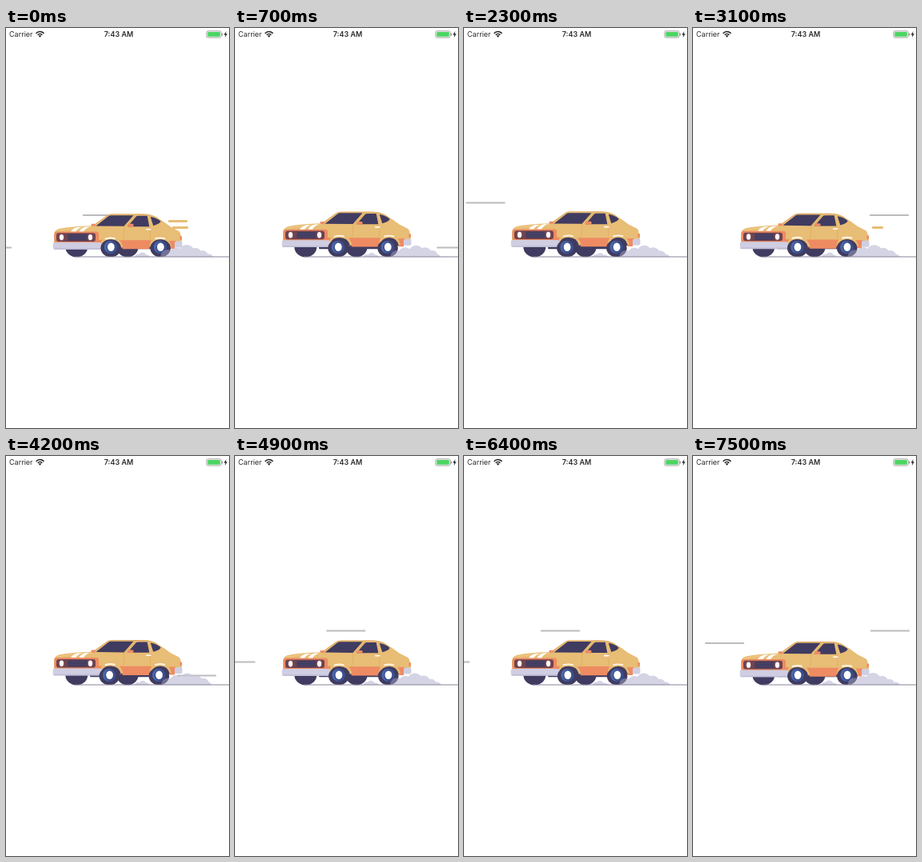
Animation of 279x500 px, one loop 7.6 s. Source, as an HTML page with a canvas:

```html
<!DOCTYPE html>
<html lang="en">
<head>
<meta charset="utf-8">
<title>Speeding car</title>
<style>
  html, body { margin: 0; width: 100%; height: 100%; overflow: hidden; background: #fff; }
  canvas { position: absolute; left: 0; top: 0; width: 279px; height: 500px; }
  span { position: absolute; top: 2px; font: 9px/12px Inter, "Liberation Sans", sans-serif; color: #2b2b2b; white-space: nowrap; }
  .carrier { left: 4px; }
  .clock { left: 91px; width: 100px; text-align: center; font-weight: 600; }
</style>
</head>
<body>
<canvas id="stage"></canvas>
<span class="carrier">Carrier</span>
<span class="clock">7:43 AM</span>
<script>
const W = 279, H = 500, LOOP = 7600, STEP = 100, CYCLE = 504;
const C = {
  navy: '#403b60', yellow: '#e8bd75', edge: '#dda65f', coral: '#ee8b62',
  maroon: '#6d4350', chrome: '#cfcee2', shade: '#bfbdd5', blue: '#4a68b0',
  wind: '#bcbcbf', ground: '#89849c', smoke: '#d5d3e5'
};

const canvas = document.getElementById('stage');
const ctx = canvas.getContext('2d');
const dpr = window.devicePixelRatio || 1;
canvas.width = Math.round(W * dpr);
canvas.height = Math.round(H * dpr);

function fill(path, color) {
  ctx.fillStyle = color;
  ctx.fill(new Path2D(path));
}

function stroke(path, color, width, cap = 'round') {
  ctx.strokeStyle = color;
  ctx.lineWidth = width;
  ctx.lineCap = cap;
  ctx.lineJoin = 'round';
  ctx.stroke(new Path2D(path));
}

function oval(x, y, rx, ry, color) {
  ctx.fillStyle = color;
  ctx.beginPath();
  ctx.ellipse(x, y, rx, ry, 0, 0, Math.PI * 2);
  ctx.fill();
}

function box(x, y, w, h, r, color) {
  ctx.fillStyle = color;
  ctx.beginPath();
  ctx.roundRect(x, y, w, h, r);
  ctx.fill();
}

// Piecewise linear curve through [input, output] points.
function curve(points, v) {
  let i = 1;
  while (i < points.length - 1 && v > points[i][0]) i++;
  const [a, x] = points[i - 1], [b, y] = points[i];
  return x + (y - x) * Math.min(1, Math.max(0, (v - a) / (b - a)));
}

const SPAN = 716;
const travel = [[0, 303], [76, 428], [168, 559], [352, 96 + SPAN], [392, 157 + SPAN],
  [444, 222 + SPAN], [460, 237 + SPAN], [504, 303 + SPAN]];
const windLines = [[218.5, 0], [234, 207], [257.5, 138], [274.5, 345]];

function drawWind(phase) {
  const head = curve(travel, phase);
  for (const [y, lag] of windLines) {
    for (const wrap of [0, SPAN]) {
      const x = head - lag - wrap;
      stroke(`M${x + .8} ${y}H${x + 48.2}`, C.wind, 2);
    }
  }
}

function streak(y, left, right) {
  if (right - left > 2) stroke(`M${left + 1.3} ${y}H${right - 1.3}`, C.yellow, 2.9);
}

function drawStreaks(phase) {
  const p = phase > CYCLE / 2 ? phase - CYCLE : phase;
  if (p < -44 || p > 130) return;
  streak(241.5, curve([[-44, 180], [0, 203], [50, 238]], p), curve([[-44, 182], [0, 227], [50, 238]], p));
  streak(249.5, curve([[-44, 190], [0, 208], [76, 224], [130, 240]], p),
    curve([[-44, 192], [0, 228], [76, 238], [130, 241]], p));
}

// The tyre top stays tucked below the arch.
function wheel(x) {
  oval(x, 275.2, 12.8, 10.9, C.navy);
  oval(x - .4, 273.9, 8, 8, C.blue);
  oval(x + 1.2, 274.2, 6.9, 7.4, '#3b4f8c');
  oval(x + .2, 273.8, 4.4, 5.2, '#fff');
}

function drawFront() {
  box(60.5, 254.5, 55.5, 14, 3, C.coral);
  box(63, 256.3, 49, 10.7, 3, C.maroon);
  box(77.5, 257.8, 24, 7.6, 1.5, C.navy);
  for (const y of [260, 263]) stroke(`M79 ${y}H100`, '#57506f', .6);
  for (const x of [69.5, 105.5]) {
    oval(x, 261.6, 4, 4.8, '#7f4c55');
    oval(x, 261.6, 2.6, 3.7, '#fff');
  }
  box(58.7, 268, 60.5, 8.8, 2, C.chrome);
  box(60, 275.2, 58, 1.5, .7, C.shade);
}

function drawBody() {
  fill('M60 259Q60 253 66 251Q82 247.8 108 247.2L126 234.5Q128.5 232.5 133 232.5H172Q182 232.5 190 237.6Q199 243.2 206 248.6L215.5 253.4Q218.6 255 218.8 260L220 267L214 272H118L60 269Z', C.yellow);
  fill('M142 265.2H182L179 276.3H146Z', C.coral);
  fill('M203 266H213L211 276H205Z', C.coral);
  fill('M114 265L122 264.5L119 271H114Z', C.coral);

  // Flared arches
  fill('M118 270Q119 261 130.5 261Q142 261 146.5 273L144 275H120Z', C.yellow);
  fill('M179.5 273Q182 261 193 261Q203.5 261 207 273L205 275H182Z', C.yellow);
  fill('M119 274Q120 264.8 130.8 264.8Q141.5 264.8 144 275Z', C.navy);
  fill('M181.5 275Q183 264.8 193 264.8Q202.5 264.8 205 275Z', C.navy);
  stroke('M124.5 263.4Q131 261.6 136 263.2', '#fff7e8', 1.9);
  stroke('M187 263.2Q193 261.7 198.5 263.2', '#fff7e8', 1.9);

  // Glass and pillars
  fill('M112.5 247.5L128.5 235Q129.5 234.2 131.5 234.2H159.5L147.5 247.8Z', C.navy);
  fill('M152 248.2L162.5 236Q163.5 234.8 165.5 234.8H176.7L179.3 248.2Z', C.navy);
  fill('M180.8 235.9Q188 237 193.6 241.6Q193 244.8 184.3 247.2Q182.2 241 180.8 235.9Z', C.navy);
  stroke('M109 247.4L126.8 234.4Q128.8 232.9 133 232.9H172Q181.5 232.9 189 237.2', C.edge, .8);
  stroke('M149.3 248.5L162.2 234.2', C.edge, .7);
  stroke('M147.8 249Q148 259 146.5 264M179.8 248.5Q181.5 256 180.5 263', C.edge, .6);
  stroke('M175.8 251.7H180.8', '#fff', 1.6);

  // Hood
  stroke('M64 253.5Q82 249.5 107 248.7', '#f0cc89', 1);
  fill('M81 254.8Q83 250.4 89.5 249H94.5Q88.5 251.5 87 254.8Z', '#fff');
  fill('M91.5 254.8Q93 250 100 248.4H104.5Q98.5 251 97 254.8Z', '#fff');
  box(106.5, 244.8, 5.5, 3, 1.2, C.coral);
  box(152.3, 244.8, 7.2, 3.7, 1.3, C.coral);

  box(217.5, 260, 2.6, 5, 1, C.coral);
  box(211, 266.5, 9.5, 8, 2, C.chrome);
  drawFront();
}

function drawCar(lift) {
  const slide = -2.4 * lift;
  oval(88.3, 273.8, 14, 12.5, C.navy);
  oval(152, 273.8, 13.6, 12.5, C.navy);
  box(105, 268, 76, 8.3, 1, C.navy);
  ctx.save();
  ctx.translate(0, -3.2 * lift);
  drawBody();
  ctx.restore();
  wheel(131.2 + slide);
  wheel(193.2 + slide);
}

// Overlapping puffs clipped at the road, filled as one shape.
function puffs(list) {
  const path = new Path2D();
  for (const [x, y, r] of list) {
    path.moveTo(x + r, y);
    path.arc(x, y, r, 0, Math.PI * 2);
  }
  ctx.fill(path);
}

function drawSmoke(phase, alpha) {
  const a = phase / CYCLE * Math.PI * 2;
  const sway = Math.sin(a), swell = Math.cos(a);
  ctx.save();
  ctx.beginPath();
  ctx.rect(150, 260, 129, 26);
  ctx.clip();
  ctx.globalAlpha = alpha;
  ctx.fillStyle = C.smoke;
  puffs([
    [202.5, 286, 8.5 + .5 * swell], [213, 283, 8.5 + .5 * sway],
    [226 + sway, 281, 9.6 + .4 * swell], [237 + sway, 283, 8.4 - .4 * swell],
    [246 + .8 * sway, 285.5, 7.2 + .5 * sway], [253 + swell, 288, 5.4],
    [165, 287, 4.2], [170.5 + .6 * sway, 286, 5.2 + .4 * swell], [176, 287.5, 4]
  ]);
  ctx.restore();
}

function drawStatus() {
  for (const r of [3.9, 6.8]) {
    ctx.strokeStyle = '#222';
    ctx.lineWidth = 1.5;
    ctx.lineCap = 'butt';
    ctx.beginPath();
    ctx.arc(42.5, 11.3, r, -Math.PI * .76, -Math.PI * .24);
    ctx.stroke();
  }
  fill('M42.5 11.8L40.7 9.8Q42.5 8.4 44.3 9.8Z', '#222');
  ctx.strokeStyle = '#8a8a8a';
  ctx.lineWidth = .8;
  ctx.beginPath();
  ctx.roundRect(251, 3.8, 18.2, 8.2, 1.8);
  ctx.stroke();
  box(252.3, 5.1, 15.6, 5.6, .8, '#4cd562');
  box(270, 6.4, 1.1, 3, .5, '#8a8a8a');
  fill('M275.6 4L272.6 8.5H274.5L273.8 12L276.9 7.2H275Z', '#222');
}

function draw(time) {
  const phase = time % CYCLE;
  const lift = (1 - Math.cos(phase / CYCLE * Math.PI * 2)) / 2;
  ctx.setTransform(dpr, 0, 0, dpr, 0, 0);
  ctx.fillStyle = '#fff';
  ctx.fillRect(0, 0, W, H);
  drawStatus();
  drawSmoke(phase, 1);
  drawWind(phase);
  drawStreaks(phase);
  drawCar(lift);
  drawSmoke(phase, .35); // thin veil over the rear wheels
  stroke('M86 286H279', C.ground, 1.1, 'butt');
}

const start = performance.now();
function tick() {
  const t = (performance.now() - start) % LOOP;
  draw(Math.floor(t / STEP) * STEP);
  requestAnimationFrame(tick);
}
tick();
</script>
</body>
</html>
```
